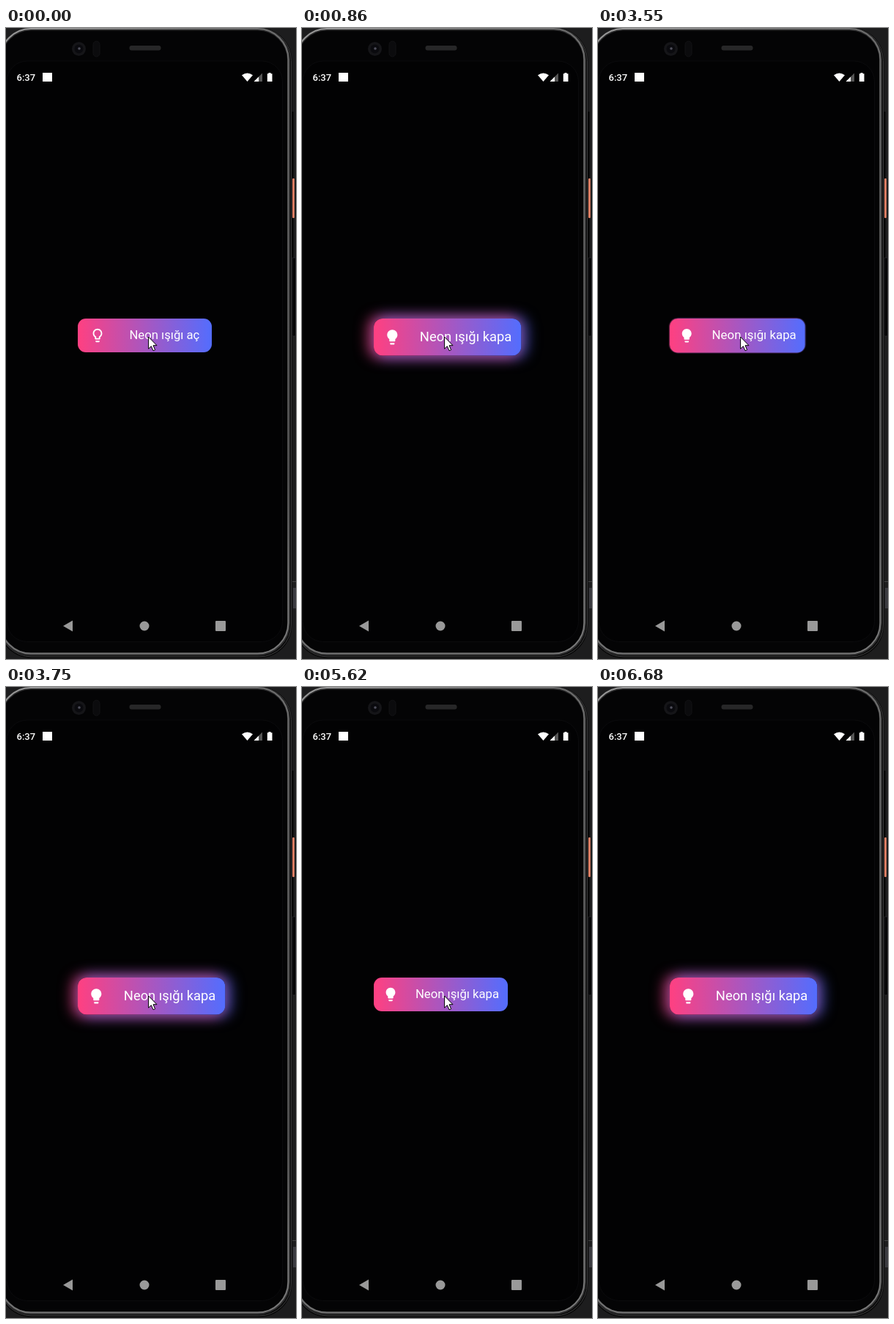
Animation, 396 px wide and 860 px high, one loop 8030 ms. Source, as an HTML page:

```html
<!DOCTYPE html>
<html lang="tr">
<head>
<meta charset="utf-8">
<title>Neon</title>
<style>
@property --p { syntax: '<number>'; inherits: true; initial-value: 0; }

html, body { margin: 0; width: 100%; height: 100%; overflow: hidden; background: #000; }
body { position: relative; font-family: Roboto, sans-serif; color: #fff; }
.phone, .cursor { position: absolute; left: 0; top: 0; display: block; }

.btn {
  position: absolute; left: 97.8px; top: 395.8px; width: 182.9px; height: 45.8px;
  transform-origin: 0 0;
  transform: scale(calc(1 + .1 * var(--p)));
  animation: neon 8030ms infinite;
}
.btn > * { position: absolute; inset: 0; border-radius: 11px; }
.glow {
  --reach: calc(16px * var(--p)) calc(3px * var(--p));
  mix-blend-mode: screen;
}
.pink { box-shadow: calc(-5px * var(--p)) 0 var(--reach) rgba(255, 64, 129, .6); }
.blue { box-shadow: calc(5px * var(--p)) 0 var(--reach) rgba(83, 109, 254, .6); }
.face { background: linear-gradient(90deg, #ff4081, #536dfe); }

.label { font-size: 16.7px; line-height: 46px; white-space: nowrap; }
.label span { position: absolute; left: var(--text); top: 0; }
.label svg {
  position: absolute; left: calc(var(--icon) - 10.8px); top: 11.9px;
  width: 22px; height: 22px; fill: #fff;
}
.off { --icon: 27.4px; --text: 70.6px; animation: off 8030ms step-end infinite; }
.on { --icon: 23.1px; --text: 57.1px; animation: on 8030ms step-end infinite; }
.cursor { left: 194px; top: 420px; animation: leave 8030ms step-end infinite; }

/* each toggle plays in six even steps, then holds */
@keyframes neon {
  0% { --p: 0; animation-timing-function: step-end; }
  8.094% { --p: .1; animation-timing-function: steps(6); }
  10.709% { --p: 1; animation-timing-function: step-end; }
  34.744% { --p: .82; animation-timing-function: steps(6); }
  37.359% { --p: 0; animation-timing-function: step-end; }
  44.209% { --p: .09; animation-timing-function: steps(6); }
  46.699% { --p: 1; animation-timing-function: step-end; }
  60.024% { --p: .82; animation-timing-function: steps(6); }
  62.64% { --p: 0; animation-timing-function: step-end; }
  69.987% { --p: 0; animation-timing-function: steps(6); }
  72.478%, 100% { --p: 1; animation-timing-function: step-end; }
}
@keyframes off {
  0%, 34.744%, 60.024% { visibility: visible; }
  8.094%, 44.209%, 69.987%, 100% { visibility: hidden; }
}
@keyframes on {
  0%, 34.744%, 60.024% { visibility: hidden; }
  8.094%, 44.209%, 69.987%, 100% { visibility: visible; }
}
@keyframes leave {
  0% { transform: none; visibility: visible; }
  81.07% { transform: translate(-3px, 6px); }
  81.493% { transform: translate(-12px, 22px); }
  81.917% { transform: translate(-27px, 48px); }
  82.34% { transform: translate(-48px, 82px); }
  82.764% { transform: translate(-74px, 120px); visibility: visible; }
  83.187%, 100% { transform: translate(-74px, 120px); visibility: hidden; }
}
</style>
</head>
<body>
<svg class="phone" width="396" height="860" viewBox="0 0 396 860">
  <defs>
    <linearGradient id="rim" x2=".15" y2="1">
      <stop offset="0" stop-color="#a0a0a0"/>
      <stop offset=".1" stop-color="#707070"/>
      <stop offset=".85" stop-color="#5a5a5a"/>
      <stop offset="1" stop-color="#777"/>
    </linearGradient>
  </defs>

  <!-- backdrop and side keys -->
  <rect width="396" height="860" fill="#1d1d1e"/>
  <path d="M391.5 114V313" stroke="#050505" stroke-width="2"/>
  <rect x="391" y="205" width="3" height="54" rx="1" fill="#d97c62"/>
  <rect x="391" y="313" width="4.5" height="107" rx="1.5" fill="#050506" stroke="#303034" stroke-width=".7"/>
  <path d="M391 754.5H396" stroke="#444"/>
  <rect x="392" y="763" width="4" height="28" fill="#3b3b40"/>

  <!-- body -->
  <rect x="-10" y="-.5" width="400.5" height="859.5" rx="45" fill="#080808"/>
  <rect x="-9" y=".5" width="398.5" height="856.5" rx="44" fill="none" stroke="#3c3c3d"/>
  <rect x="-8" y="1.5" width="394" height="852" rx="42" fill="#040405" stroke="#2c2c2d" stroke-width="4"/>
  <rect x="-8" y="1" width="393.5" height="851.5" rx="42" fill="none" stroke="url(#rim)" stroke-width="2"/>
  <rect x="1" y="45" width="376.5" height="791.5" rx="28" fill="#020203" stroke="#0b0b0d"/>
  <circle cx="99.5" cy="28.5" r="9.5" fill="#151518"/>
  <circle cx="99.5" cy="28.5" r="6" fill="#0a0a0e"/>
  <circle cx="100" cy="28" r="1.8" fill="#50505c"/>
  <rect x="119" y="18" width="9" height="21" rx="4.5" fill="#0b0b0d" stroke="#131315"/>
  <rect x="168.5" y="24" width="43" height="6.5" rx="3" fill="#272728"/>

  <!-- status bar -->
  <g fill="#fff">
    <text x="14.5" y="72" font-family="Roboto, sans-serif" font-size="13" font-weight="500">6:37</text>
    <rect x="50" y="61" width="13" height="12"/>
    <path d="M329.5 73L322 64.2Q329.5 58.6 337 64.2Z"/>
    <path d="M350 61.5V73H338.5Z" fill="#555"/>
    <path d="M345 66.5V73H338.5Z"/>
    <path d="M358.5 62.3V61H361.5V62.3H363.5V73H356.8V62.3Z"/>
  </g>

  <!-- navigation -->
  <g fill="#999">
    <path d="M78 815L91 807.5V822.5Z"/>
    <circle cx="189" cy="815" r="6.5"/>
    <rect x="286" y="808" width="14" height="14" rx="1"/>
  </g>
</svg>

<div class="btn">
  <div class="glow pink"></div>
  <div class="glow blue"></div>
  <div class="face"></div>
  <div class="label off">
    <svg viewBox="0 0 24 24"><path d="M9 21c0 .55.45 1 1 1h4c.55 0 1-.45 1-1v-1H9v1zm3-19C8.14 2 5 5.14 5 9c0 2.38 1.19 4.47 3 5.74V17c0 .55.45 1 1 1h6c.55 0 1-.45 1-1v-2.26c1.81-1.27 3-3.36 3-5.74 0-3.86-3.14-7-7-7zm2.85 11.1l-.85.6V16h-4v-2.3l-.85-.6C7.8 12.16 7 10.63 7 9c0-2.76 2.24-5 5-5s5 2.24 5 5c0 1.63-.8 3.16-2.15 4.1z"/></svg>
    <span>Neon ışığı aç</span>
  </div>
  <div class="label on">
    <svg viewBox="0 0 24 24"><path d="M9 21c0 .55.45 1 1 1h4c.55 0 1-.45 1-1v-1H9v1zm3-19C8.14 2 5 5.14 5 9c0 2.38 1.19 4.47 3 5.74V17c0 .55.45 1 1 1h6c.55 0 1-.45 1-1v-2.26c1.81-1.27 3-3.36 3-5.74 0-3.86-3.14-7-7-7z"/></svg>
    <span>Neon ışığı kapa</span>
  </div>
</div>

<svg class="cursor" width="14" height="22" viewBox="0 0 14 22">
  <path d="M.6 1V17.2L4.3 13.7L7 19.8L9.6 18.7L7 12.7H12Z" fill="#fff" stroke="#000" stroke-width="1"/>
</svg>
</body>
</html>
```
